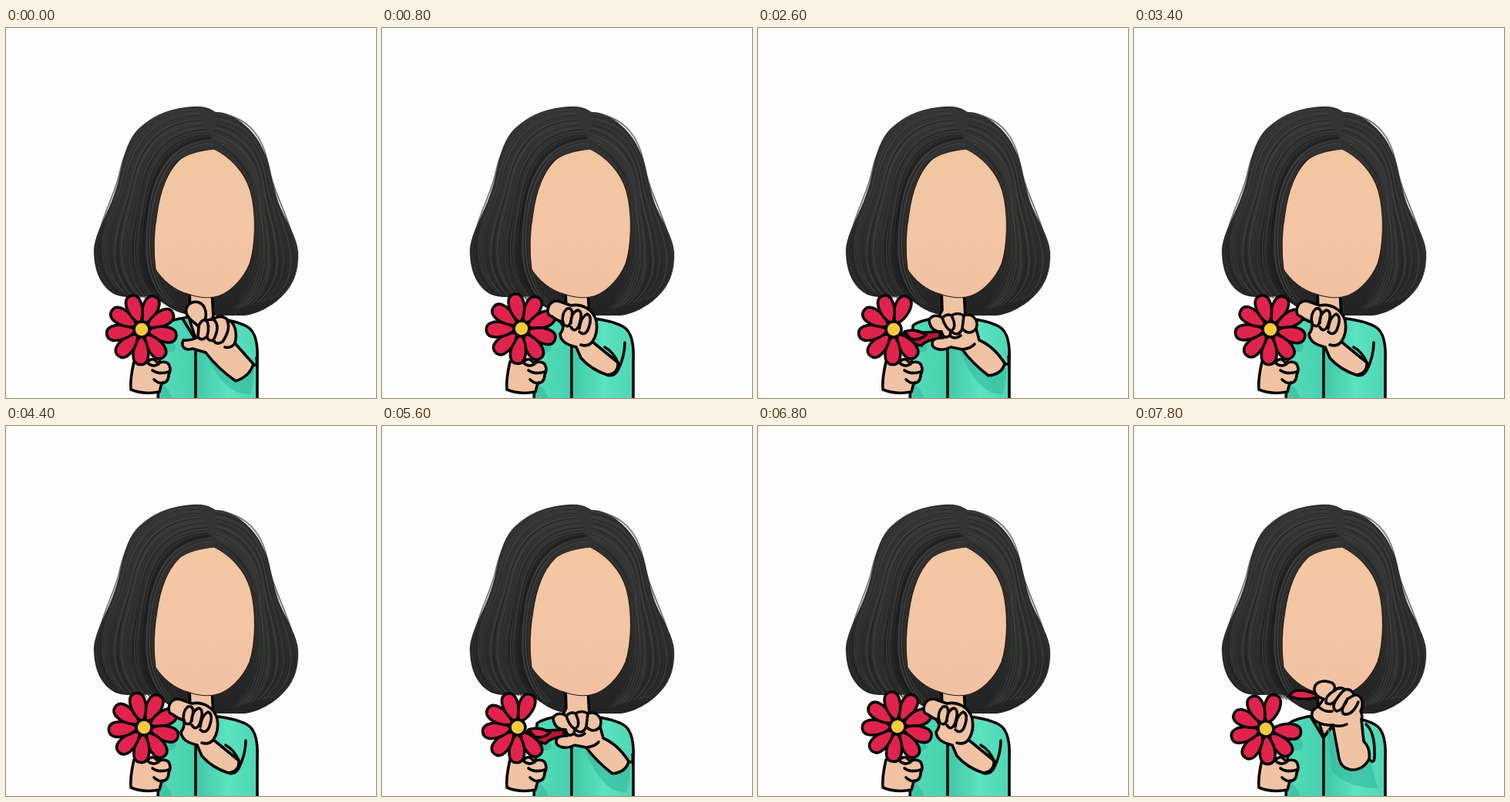
These frames come from a looping animation (480 by 480 pixels, 8000 ms). An HTML page:

```html
<!DOCTYPE html>
<html lang="en">
<head>
<meta charset="utf-8">
<title>Plucking petals</title>
<style>
  html, body { margin: 0; width: 100%; height: 100%; overflow: hidden; background: #fdfdfd; }
  svg { display: block; width: 100%; height: 100%; }
  .ink { stroke: #080606; stroke-width: 3.6; stroke-linejoin: round; stroke-linecap: round; }
  .skin { fill: #efc3a4; }
  .line { fill: none; }
  .shade { fill: #35b79e; opacity: .6; }
  .petal { fill: #e0234c; }
  .fold { fill: #b81638; }
  .pose { display: none; }
</style>
</head>
<body>
<svg viewBox="0 0 480 480">
  <defs>
    <linearGradient id="skinTone" x1="0" y1="0" x2="0" y2="1">
      <stop offset="0" stop-color="#f1c7a1"/>
      <stop offset=".5" stop-color="#f3c6a4"/>
      <stop offset="1" stop-color="#f2c1a3"/>
    </linearGradient>
    <linearGradient id="hairTone" x1="0" y1="0" x2="0" y2="1">
      <stop offset="0" stop-color="#343534"/>
      <stop offset=".5" stop-color="#2e2f2e"/>
      <stop offset="1" stop-color="#222322"/>
    </linearGradient>
    <linearGradient id="shirtTone">
      <stop offset="0" stop-color="#55dcb9"/>
      <stop offset=".35" stop-color="#48d2b0"/>
      <stop offset=".42" stop-color="#43caa9"/>
      <stop offset=".7" stop-color="#5be3c1"/>
      <stop offset="1" stop-color="#4fd6b5"/>
    </linearGradient>
  </defs>

  <path fill="url(#hairTone)" d="M272 109C262 102 252 101 241 102C212 104 186 115 168 135C156 150 152 170 148 188C143 215 133 235 123 256C117 270 113 283 114 293C115 320 126 338 142 346C158 352 176 347 194 349C208 361 222 371 243 373H310C334 370 358 352 368 336C377 322 380 306 379 290C377 268 360 246 352 222C344 198 344 176 332 155C322 134 298 109 272 109Z"/>
  <g id="strands" fill="none" stroke-linecap="round"/>
  <path class="skin ink" d="M238 340L239 366L232 380L247 403L269 376L267 340Z"/>
  <path fill="url(#skinTone)" stroke="#2a1d17" stroke-width="1.2" d="M270 157C252 159 234 163 224 172C208 188 200 212 196 240C192 262 191 290 194 313C203 328 220 341 236 345C247 349 258 351 270 349C289 346 308 326 316 306C324 282 325 240 317 211C309 185 289 166 270 157Z"/>

  <path fill="url(#shirtTone)" class="ink" d="M237 375C224 377 208 380 201 386L197 484H326L326 430C327 407 322 392 312 387C301 381 285 378 268 376L246 403Z"/>
  <path class="shade" d="M203 390Q225 412 218 419Q207 425 202 414ZM199 480L202 460Q211 468 216 480Z"/>
  <path class="ink line" d="M229 377L246 405V480M268 376L247 403"/>

  <path class="skin ink" d="M166 433C163 446 161 458 162 469Q179 476 199 472L202 461Q211 460 211 450Q215 443 211 436Q206 431 197 435Q190 425 183 434Q174 430 166 433Z"/>
  <path class="ink line" d="M183 434Q190 441 198 436M190 444Q198 450 211 446M192 456Q198 462 204 460"/>

  <g id="flower"></g>

  <g id="reach" class="pose">
    <path class="shade" d="M260 424L300 458L322 442L318 475Q284 478 260 424Z"/>
    <path class="skin ink" d="M230 405C226 414 233 419 242 416L259 421Q275 442 298 458Q316 452 321 436L297 409C300 397 298 382 288 379C281 372 273 374 269 378L258 379C261 371 259 359 250 356C240 353 232 361 234 370C237 379 246 382 250 388L249 401Q239 406 230 405Z"/>
    <path class="ink line" d="M250 388Q251 380 259 378Q265 385 261 400Q254 407 249 401M269 378Q279 386 269 405Q262 407 261 400M287 380Q292 390 281 407Q273 412 269 405M297 409Q292 416 284 414M321 436Q327 441 325 428"/>
  </g>

  <g id="grip" class="pose">
    <path class="skin ink" d="M211 367C212 355 221 352 230 356L241 360C255 357 270 365 274 380C276 391 273 401 269 407L302 434Q303 449 288 450Q267 443 254 428L248 414C236 411 228 407 227 397Q232 391 231 382Q222 379 216 374Q211 373 211 367Z"/>
    <path class="ink line" d="M231 384Q228 371 236 364Q246 362 241 380Q239 391 231 384M241 383Q241 369 250 366Q258 368 251 387Q246 396 241 388M252 390Q254 375 262 371Q270 374 263 392Q258 400 252 394M269 407Q263 414 254 411M288 450Q297 453 302 444Q311 426 311 408M302 434Q296 420 285 414"/>
  </g>

  <g id="raise" class="pose">
    <path class="shade" d="M251 390Q261 406 264 436L282 448L307 434L316 470Q275 469 256 447Z"/>
    <path class="petal ink" d="M240 351C231 355 211 356 202 350C205 340 225 341 240 351Z"/>
    <path class="skin ink" d="M234 343C233 333 244 329 253 332C260 333 262 339 259 344Q266 337 274 342Q281 340 286 349C297 348 298 362 294 370Q297 376 295 381L298 409Q307 418 305 432Q297 447 281 446Q268 443 266 431L258 388C246 389 233 384 231 377Q229 369 239 364L246 354Q235 351 234 343Z"/>
    <path class="ink line" d="M259 344Q248 350 249 359Q256 364 263 354Q268 346 274 342M263 354Q255 366 263 370Q272 368 277 354L286 349M277 354Q266 371 273 374Q284 375 291 358M239 364Q248 372 257 370M258 388Q268 391 276 387M305 432Q313 442 312 422Q312 397 301 387"/>
  </g>

  <g id="pinch" class="pose">
    <path class="shade" d="M261 416L299 451L323 440L318 475Q286 479 261 416Z"/>
    <path class="fold ink" d="M187 397Q200 389 213 395L236 394V403Q219 404 212 412Q203 412 198 403Z"/>
    <path class="petal ink" d="M190 394Q202 389 218 398Q209 406 198 403Z"/>
    <path class="skin ink" d="M223 384C219 375 230 370 239 376Q245 370 251 373Q259 368 267 373C278 369 287 379 283 390L287 405Q306 413 320 435Q317 449 299 451Q278 435 265 417L250 414C239 420 225 417 226 408Q227 402 240 402L238 394Q226 394 223 384Z"/>
    <path class="ink line" d="M239 376Q243 389 250 393Q259 389 251 373M238 394Q241 405 249 399L250 393M250 393Q260 402 265 390L267 373M265 390Q274 400 283 390M249 399Q255 405 263 399M265 417Q276 416 281 410M320 435Q327 440 325 426"/>
  </g>
</svg>

<script>
const SVG_NS = "http://www.w3.org/2000/svg";
const byId = id => document.getElementById(id);

function add(parent, tag, attributes) {
  const node = document.createElementNS(SVG_NS, tag);
  for (const name in attributes) node.setAttribute(name, attributes[name]);
  parent.append(node);
  return node;
}

let seed = 7;
const random = () => (seed = seed * 16807 % 2147483647) / 2147483647;

// Each strand blends between the outer edge and the face edge of one side.
const hairSides = [
  { outer: [248, 104, 185, 104, 158, 140, 148, 188, 139, 232, 92, 290, 142, 342],
    inner: [270, 155, 222, 158, 203, 195, 195, 240, 190, 280, 192, 330, 225, 360] },
  { outer: [272, 111, 320, 115, 335, 150, 341, 183, 350, 235, 410, 310, 350, 350],
    inner: [271, 156, 300, 172, 322, 200, 325, 245, 327, 290, 320, 330, 292, 365] }
];
const strandColors = ["#4b4d4b", "#414341", "#1a1b1a", "#212221"];

for (const { outer, inner } of hairSides) {
  for (let i = 0; i < 95; i++) {
    const blend = i < 4 ? -0.02 * random() : 0.03 + 0.95 * random();
    const p = outer.map((v, k) => (v + (inner[k] - v) * blend + random() * 3 - 1.5).toFixed(1));
    add(byId("strands"), "path", {
      d: `M${p.slice(0, 2)}C${p.slice(2)}`,
      stroke: strandColors[Math.floor(random() * 4)],
      "stroke-width": 0.5 + random() * 0.8,
      opacity: 0.25 + random() * 0.4
    });
  }
}

const flower = byId("flower");
const petals = Array.from({ length: 9 }, (_, i) => add(flower, "path", {
  class: "petal ink",
  d: "M8 0C14-7 28-12 39-9C48-6 48 6 39 9C28 12 14 7 8 0Z",
  transform: `rotate(${i * 40 - 68})`
}));
add(flower, "circle", { class: "ink", r: 10, fill: "#fbc93d" });

// Steps: pose, hand offset x and y, flower x and y, petals already plucked.
const STEP = 200, LOOP = 8000;
const REST_X = 176, TILT_PER_PIXEL = 1.2;
const steps = [
  ["reach", 0, 0, 176, 391, 0],
  ["reach", -4, -3, 176, 391, 0],
  ["grip", 0, 0, 177, 391, 0],
  ["grip", 0, 0, 179, 391, 0],
  ["grip", 4, 0, 181, 390, 0],
  ["grip", 0, 0, 179, 391, 0],
  ["grip", 4, 0, 181, 390, 0],
  ["grip", 0, 0, 179, 391, 0],
  ["grip", 4, 0, 181, 390, 0],
  ["raise", 0, 0, 171, 393, 1],
  ["raise", 0, 0, 172, 393, 1],
  ["reach", 0, 0, 175, 392, 1],
  ["pinch", 0, 0, 176, 391, 2],
  ["pinch", 0, 0, 176, 391, 2],
  ["pinch", 0, 0, 176, 391, 2]
];
const poses = document.querySelectorAll(".pose");

function draw(now) {
  const step = Math.floor(now % LOOP / STEP) % steps.length;
  const [pose, handX, handY, flowerX, flowerY, plucked] = steps[step];
  for (const node of poses) node.style.display = node.id === pose ? "inline" : "none";
  byId(pose).setAttribute("transform", `translate(${handX} ${handY})`);
  const tilt = (flowerX - REST_X) * TILT_PER_PIXEL;
  flower.setAttribute("transform", `translate(${flowerX} ${flowerY}) rotate(${tilt})`);
  petals.forEach((petal, i) => petal.style.display = i >= 1 && i <= plucked ? "none" : "inline");
}

const start = performance.now();
function tick() {
  draw(performance.now() - start);
  requestAnimationFrame(tick);
}
draw(0);
requestAnimationFrame(tick);
</script>
</body>
</html>
```
